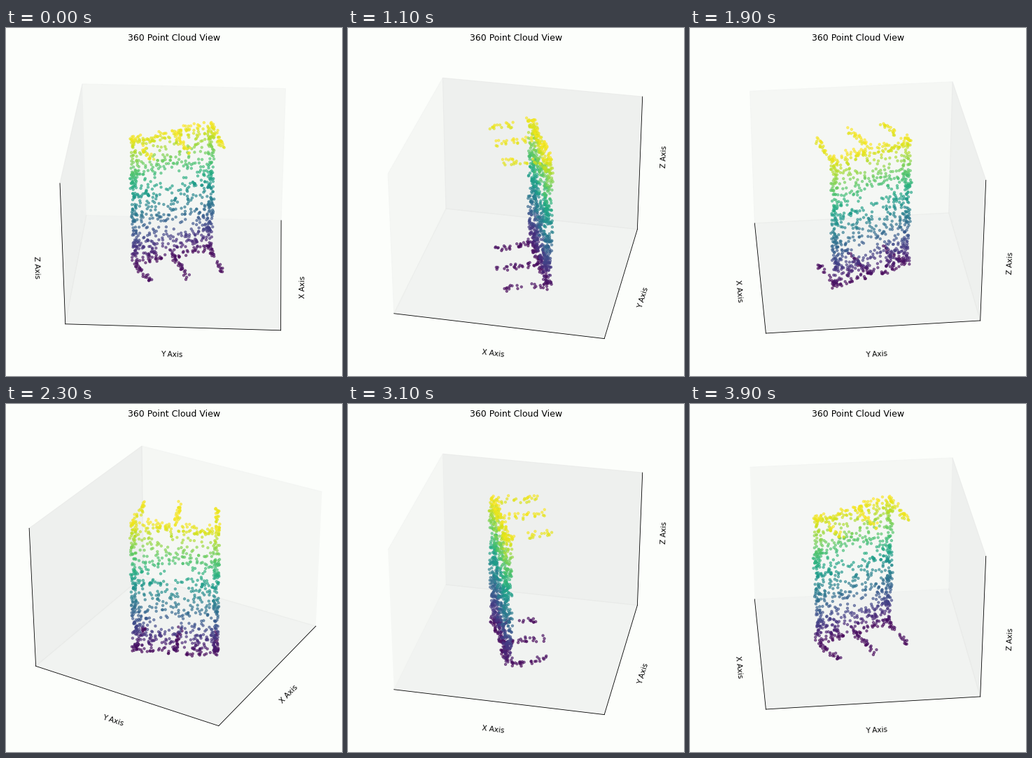
Recreate the animation shown at these times as a matplotlib script. Size 480 by 497 pixels, loop 4000 ms.

```python
import numpy as np
import matplotlib.pyplot as plt
from matplotlib.animation import FuncAnimation

W, H, DPI = 480, 497, 75
SIDE = 465
PAPER = "#fcfefb"
FRAMES, STEP, START = 40, 9, 3

CORNER = np.array([-0.014, -0.27])
ALONG = np.array([-0.192, 0.46])
OUT = np.array([0.923, 0.385])
LOW, HIGH = -0.438, 0.425

rng = np.random.default_rng(12)


def block(n, u, w, z):
    """Random samples in (along panel, outward, height) ranges."""
    return np.column_stack([rng.uniform(*span, n) for span in (u, w, z)])


def prong(u, z, n, start=0.02, end=0.26, spread=0.02):
    """Finger pointing outward, leaning a little towards the panel's middle."""
    pts = block(n, (u - 0.025, u + 0.025), (start, end), (z - spread, z + spread))
    pts[:, 0] += (0.5 - u) * 0.5 * pts[:, 1]
    return pts


def make_cloud():
    panel = block(540, (0, 1), (-0.015, 0.02), (LOW, 0.41))
    hole = np.hypot((panel[:, 0] - 0.47) * 0.5, panel[:, 2] - 0.11) < 0.055
    parts = [
        panel[~hole],
        block(110, (0, 0.06), (-0.02, 0.03), (LOW, 0.41)),
        block(110, (0.94, 1), (-0.02, 0.03), (LOW, 0.41)),
        block(65, (0, 1), (-0.015, 0.025), (0.36, HIGH)),
        block(85, (0, 1), (-0.015, 0.025), (LOW, -0.27)),
        prong(0.02, 0.395, 17, start=0.12),
        prong(0.02, 0.395, 4, end=0.06),
        prong(0.5, 0.405, 26),
        prong(0.98, 0.395, 24),
        prong(0.02, -0.417, 26),
        prong(0.5, -0.417, 26),
        prong(0.98, -0.417, 11, start=0.15),
        prong(0.98, -0.417, 9, end=0.1),
    ]
    u, w, z = np.vstack(parts).T
    xy = CORNER + u[:, None] * ALONG + w[:, None] * OUT
    return xy[:, 0], xy[:, 1], z


fig = plt.figure(figsize=(W / DPI, H / DPI), dpi=DPI, facecolor=PAPER)
ax = fig.add_axes([7.5 / W, 8 / H, SIDE / W, SIDE / H], projection="3d")
ax.set_facecolor(PAPER)
for axis, shade in ((ax.xaxis, 0.938), (ax.yaxis, 0.885), (ax.zaxis, 0.91)):
    axis.set_pane_color((shade, shade + 0.007, shade, 0.5))

x, y, z = make_cloud()
ax.scatter(x, y, z, c=z, cmap="viridis", s=10, alpha=0.6)

ax.set(xlim=(-0.5952, 0.5952), ylim=(-0.5952, 0.5952), zlim=(-0.4464, 0.4464),
       xticks=[], yticks=[], zticks=[],
       xlabel="X Axis", ylabel="Y Axis", zlabel="Z Axis")
# 3D axes scale the title height by 0.92
ax.set_title("360 Point Cloud View", y=1 / 0.92)


def update(i):
    ax.view_init(elev=30, azim=START + STEP * i)
    return ()


anim = FuncAnimation(fig, update, frames=FRAMES, interval=100, repeat=True,
                     repeat_delay=0, blit=False)
plt.show()
```
